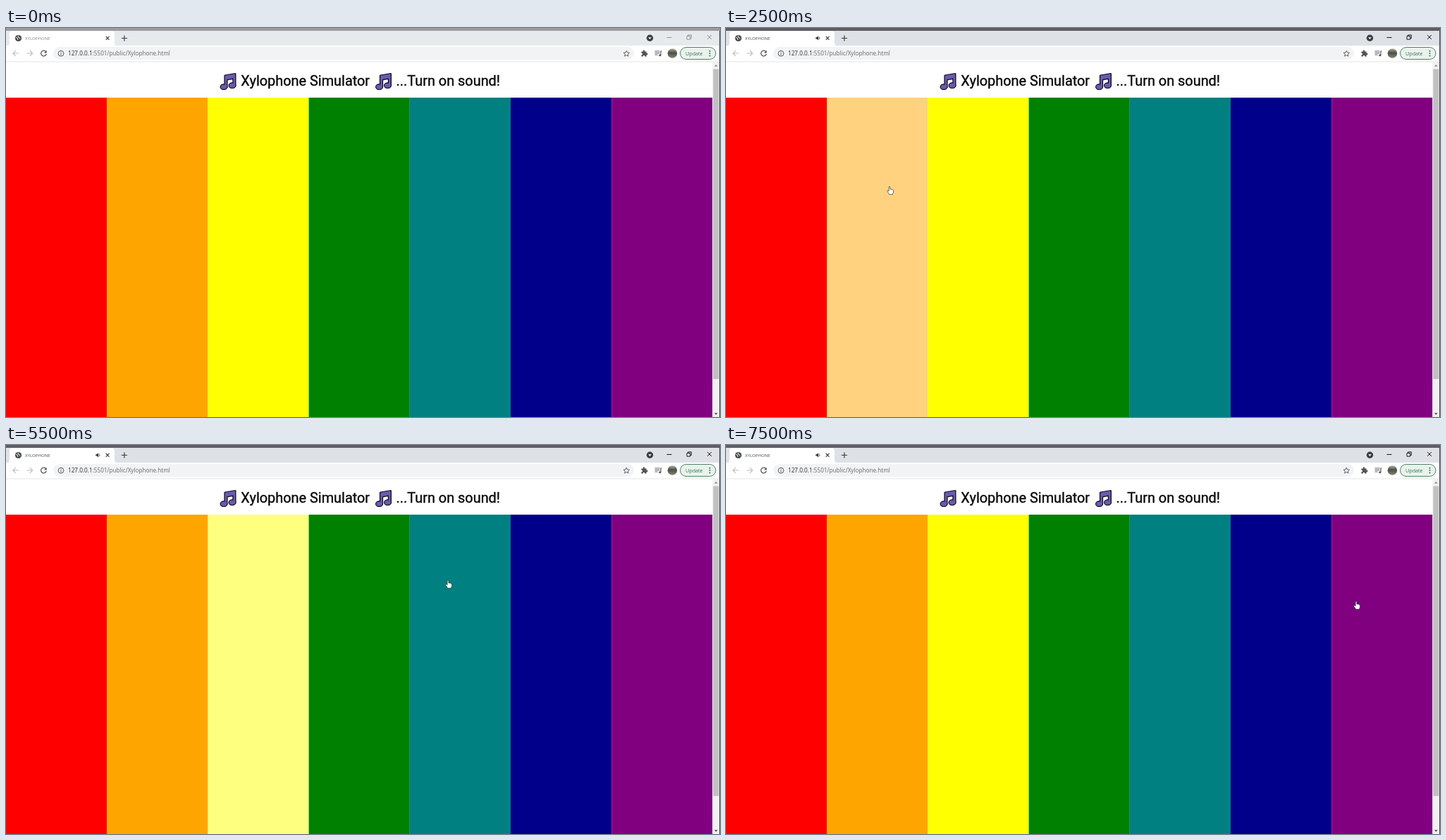
An HTML page for the animation above (8 s loop, 1013 by 553 pixels).

```html
<!DOCTYPE html>
<html lang="en">
<head>
<meta charset="utf-8">
<title>Xylophone</title>
<style>
  html, body { margin: 0; width: 100%; height: 100%; overflow: hidden; background: #fff; }
  svg { display: block; width: 1013px; height: 553px; }
  .ui { font-family: "Open Sans", "Noto Sans", sans-serif; }
  .title { font: 19.9px Roboto, sans-serif; fill: #0b0b0b; stroke: #0b0b0b; stroke-width: .4; }
  .line { fill: none; stroke: currentColor; }

  /* The picture advances in half-second steps. */
  .edge, .strip, .caption, .controls, .sound, .hand, .bar { animation: 8s step-end infinite; }
  .edge { animation-name: edge; }
  .strip { animation-name: strip; }
  .caption { animation-name: caption; }
  .controls { animation-name: controls; }
  .sound { animation-name: sound; }
  .hand { animation-name: hand; }
  .red { animation-name: red; }
  .orange { animation-name: orange; }
  .yellow { animation-name: yellow; }
  .green { animation-name: green; }
  .teal { animation-name: teal; }
  .navy { animation-name: navy; }

  /* Window gains focus */
  @keyframes edge { 0% { fill: #9e9b9f } 12.5%, 100% { fill: #605e63 } }
  @keyframes strip { 0% { fill: #e7eaed } 12.5%, 100% { fill: #dee1e6 } }
  @keyframes caption { 0% { fill: #858585 } 12.5%, 100% { fill: #45484c } }
  @keyframes controls { 0% { color: #929598 } 12.5%, 100% { color: #1c1c1e } }
  @keyframes sound { 0% { opacity: 0 } 25% { opacity: .12 } 31.25%, 100% { opacity: 1 } }

  /* Struck bars turn half transparent */
  @keyframes red { 0%, 31.25%, 100% { opacity: 1 } 18.75% { opacity: .5 } }
  @keyframes orange { 0%, 37.5%, 100% { opacity: 1 } 31.25% { opacity: .5 } }
  @keyframes yellow { 0%, 50%, 75%, 100% { opacity: 1 } 43.75%, 62.5% { opacity: .5 } }
  @keyframes green { 0%, 62.5%, 100% { opacity: 1 } 56.25% { opacity: .5 } }
  @keyframes teal { 0%, 81.25%, 100% { opacity: 1 } 75% { opacity: .5 } }
  @keyframes navy { 0%, 93.75%, 100% { opacity: 1 } 87.5% { opacity: .5 } }

  @keyframes hand {
    0% { opacity: 0; transform: translate(72px, 236px) }
    12.5% { opacity: 1; transform: translate(72px, 234px) }
    18.75% { opacity: 1; transform: translate(86px, 232px) }
    25% { opacity: 1; transform: translate(231px, 230px) }
    31.25% { opacity: 1; transform: translate(233px, 231px) }
    37.5% { opacity: 1; transform: translate(345px, 236px) }
    43.75% { opacity: 1; transform: translate(355px, 236px) }
    50% { opacity: 1; transform: translate(475px, 234px) }
    56.25% { opacity: 1; transform: translate(385px, 225px) }
    62.5% { opacity: 1; transform: translate(386px, 222px) }
    68.75% { opacity: 1; transform: translate(628px, 198px) }
    75% { opacity: 1; transform: translate(634px, 199px) }
    81.25% { opacity: 1; transform: translate(796px, 214px) }
    87.5% { opacity: 1; transform: translate(799px, 215px) }
    93.75%, 100% { opacity: 1; transform: translate(895px, 228px) }
  }
</style>
</head>
<body>
<svg viewBox="0 0 1013 553">
  <defs>
    <linearGradient id="photo" x2="0" y2="1">
      <stop offset="0" stop-color="#aeb2a8"/>
      <stop offset=".45" stop-color="#4c5143"/>
      <stop offset="1" stop-color="#85847a"/>
    </linearGradient>
    <g id="noteShape">
      <path d="M7.6 3.6 22.3 1.1V18H19.5V7.6L10.4 9.2V20.1H7.6Z"/>
      <ellipse cx="6" cy="19.7" rx="4.3" ry="3.2"/>
      <ellipse cx="18" cy="17.7" rx="4.3" ry="3.2"/>
    </g>
    <g id="note">
      <use href="#noteShape" fill="#0a0a12" stroke="#0a0a12" stroke-width="2.4" stroke-linejoin="round"/>
      <use href="#noteShape" fill="#6a5ab0"/>
    </g>
  </defs>

  <!-- Tab strip -->
  <rect class="strip" width="1013" height="26"/>
  <rect class="edge" width="1013" height="4"/>
  <path d="M1 25.5Q5 25.5 5 21V8.500Q5 4.500 9 4.500H150Q154 4.500 154 8.500V21Q154 25.500 158 25.500Z" fill="#fff"/>
  <g fill="#45494d">
    <circle cx="17.500" cy="14.500" r="4.600"/>
    <path d="M14 13.300l2.600 1.300.2 2.300M17.600 10.800l-.7 1.900 2 .8 1.200 2.100" fill="none" stroke="#fff" stroke-width="1"/>
  </g>
  <text class="ui caption" x="27" y="16.800" font-size="6.100">XYLOPHONE</text>
  <g class="sound" fill="#303236">
    <path d="M127.300 13.200h1.600l2.200-2v6.400l-2.200-2h-1.600z"/>
    <path d="M132.200 12.700q1.300 1.700 0 3.400" fill="none" stroke="#303236" stroke-width=".8"/>
  </g>
  <path d="M141.700 12l4.800 4.800m0-4.800l-4.800 4.800" stroke="#3c4043" stroke-width="1.100"/>
  <path d="M163.800 14.500h8.200m-4.100-4.100v8.200" stroke="#3c4043" stroke-width="1.200"/>
  <circle cx="913.500" cy="14.300" r="4.700" fill="#3c4043"/>
  <path d="M911.300 13.200h4.400l-2.200 2.700z" fill="#fff"/>
  <g class="controls">
    <path class="line" d="M937.500 13.500h7M966 11.500h4.700v4.700H966zM967.500 11.500v-1.600h4.800v4.800h-1.500M995 10l6 6m0-6l-6 6"/>
  </g>

  <!-- Toolbar -->
  <rect y="25" width="1013" height="23" fill="#fff"/>
  <rect y="47.500" width="1013" height="1" fill="#e4e5e6"/>
  <rect x="67" y="27" width="824" height="18" rx="9" fill="#f1f3f4"/>
  <g fill="none" stroke="#b9bbbd" stroke-width="1.100">
    <path d="M18 36H10m3.700-3.900L9.800 36l3.900 3.900"/>
    <path d="M29.500 36h8m-3.700-3.900l3.900 3.900-3.900 3.900"/>
  </g>
  <path d="M56.600 33.600A3.900 3.900 0 1 0 57.300 37" fill="none" stroke="#484b4f" stroke-width="1.200"/>
  <path d="M57.700 31.800v3.600h-3.600z" fill="#484b4f"/>
  <circle cx="78" cy="36.200" r="3.900" fill="none" stroke="#55595d"/>
  <path d="M78 35.600v2.900m0-4.700v1" stroke="#55595d"/>
  <text class="ui" x="88" y="39" font-size="8.200" fill="#66696d"><tspan fill="#2b2d30">127.0.0.1</tspan>:5501/public/Xylophone.html</text>
  <path d="M880.300 32.200l1.250 2.700 2.950.3-2.200 2 .6 2.900-2.600-1.500-2.600 1.500.6-2.900-2.200-2 2.950-.3z" fill="none" stroke="#4c5054" stroke-width=".9"/>
  <path d="M901.500 33.500h2.300q-.4-2.300 1.200-2.300t1.200 2.300h2.500v2.300q2 0 2 1.200t-2 1.200v2.400h-2.400q0-1.800-1.300-1.800t-1.300 1.800h-2.200v-2.300q1.700 0 1.700-1.300t-1.700-1.300z" fill="#505459"/>
  <path d="M920.500 33h7M920.500 35.500h7M920.500 38h4.300M929 39v-6h1.600" fill="none" stroke="#505459" stroke-width="1.100"/>
  <circle cx="927.800" cy="38.700" r="1.500" fill="#505459"/>
  <circle cx="945.400" cy="36" r="6.800" fill="url(#photo)"/>
  <rect x="956.500" y="27.500" width="50.500" height="17" rx="8.500" fill="#e9f2ec" stroke="#4c8265"/>
  <text class="ui" x="964" y="38.800" font-size="7.200" fill="#3e7357">Update</text>
  <g fill="#35664d">
    <circle cx="998.500" cy="32.800" r="1"/>
    <circle cx="998.500" cy="36.100" r="1"/>
    <circle cx="998.500" cy="39.400" r="1"/>
  </g>

  <!-- Page -->
  <use href="#note" x="303" y="64"/>
  <text class="title" x="333.300" y="82.300">Xylophone Simulator</text>
  <use href="#note" x="523.500" y="64"/>
  <text class="title" x="553.500" y="82.300">...Turn on sound!</text>
  <g transform="translate(0 99)">
    <rect class="bar red" width="143.200" height="454" fill="red"/>
    <rect class="bar orange" x="143.200" width="143.200" height="454" fill="orange"/>
    <rect class="bar yellow" x="286.400" width="143.200" height="454" fill="yellow"/>
    <rect class="bar green" x="429.600" width="143.200" height="454" fill="green"/>
    <rect class="bar teal" x="572.800" width="143.200" height="454" fill="teal"/>
    <rect class="bar navy" x="716" width="143.200" height="454" fill="darkblue"/>
    <rect x="859.200" width="143.200" height="454" fill="purple"/>
  </g>

  <!-- Scrollbar -->
  <rect x="1002.400" y="48.500" width="9.600" height="505" fill="#f1f1f1"/>
  <rect x="1003.300" y="58.500" width="8" height="440.500" fill="#c1c1c1"/>
  <path d="M1004.900 54.800h4.800l-2.400-2.700z" fill="#8f8f8f"/>
  <path d="M1004.900 547.200h4.800l-2.400 2.700z" fill="#505050"/>
  <rect x="1012" y="4" width="1" height="549" fill="#505052"/>

  <path class="hand" fill="#fff" stroke="#333" stroke-width=".7" stroke-linejoin="round"
    d="M-1.900-5.200q.9-1 1.800 0V-1.900q1.300-.5 1.700.3 1.200-.3 1.600.5 1.300 0 1.300 1.200V2q0 1.500-.9 2.600v1H-1.400Q-2.400 3.600-4 1.400q-.5-1.200.3-1.500.9-.2 1.800 1.200z"/>
</svg>
</body>
</html>
```
